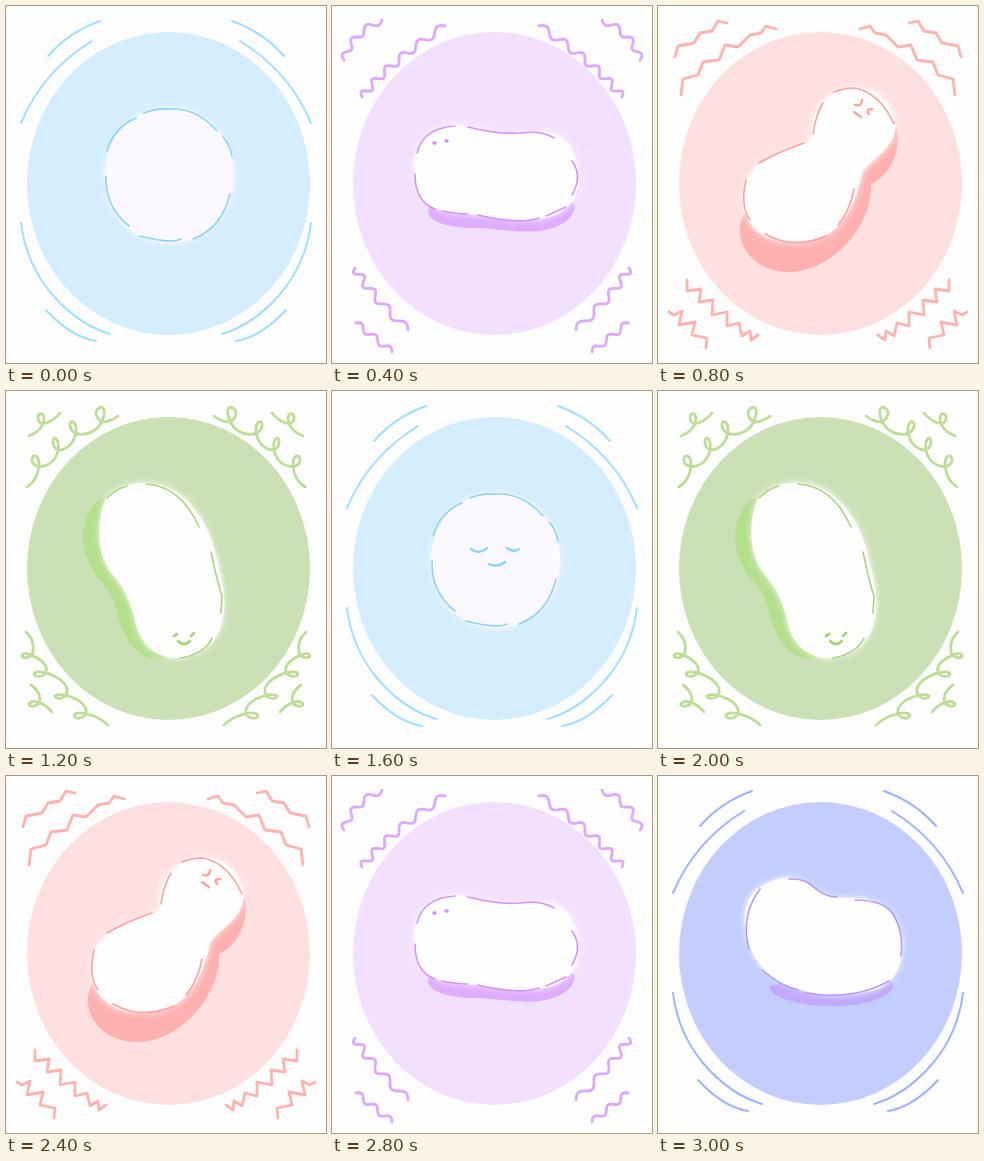
Animation, 320 px wide and 357 px high, one loop 3.2 s. Source, as an HTML page with a canvas:

```html
<!DOCTYPE html>
<html lang="en">
<head>
<meta charset="utf-8">
<title>Colour beans</title>
<style>
html, body { margin: 0; width: 100%; height: 100%; overflow: hidden; background: #fdfdfd; }
canvas { display: block; width: 320px; height: 357px; }
</style>
</head>
<body>
<canvas id="stage" width="320" height="357"></canvas>
<script>
const ctx = document.getElementById('stage').getContext('2d');
const STEP = 200;

// Sine ripple laid along a quadratic curve
function wave(x0, y0, cx, cy, x1, y1, turns, amp) {
  let d = '';
  for (let i = 0; i <= 80; i++) {
    const t = i / 80, u = 1 - t;
    const dx = 2 * u * (cx - x0) + 2 * t * (x1 - cx);
    const dy = 2 * u * (cy - y0) + 2 * t * (y1 - cy);
    const k = amp * Math.sin(t * turns * 2 * Math.PI) / Math.hypot(dx, dy);
    const x = u * u * x0 + 2 * u * t * cx + t * t * x1 + dy * k;
    const y = u * u * y0 + 2 * u * t * cy + t * t * y1 - dx * k;
    d += (i ? 'L' : 'M') + x.toFixed(2) + ' ' + y.toFixed(2);
  }
  return d;
}

// Left half of each frame decoration; the right half is mirrored
const marks = {
  arcs: 'M42 50Q63 26 94 15M15 117Q37 65 86 35M15 217Q20 257 45 287Q71 318 104 328M40 304Q65 331 90 335',
  waves: wave(12, 54, 19, 28, 50, 14, 3, 3.3) + wave(30, 91, 55, 58, 113, 20, 5.5, 3.8) +
    wave(23, 262, 37, 287, 76, 324, 4, -3.8) + wave(24, 317, 42, 331, 60, 346, 2.5, 3),
  zigzag: 'M17 51L20 40L36 37L42 27L54 25L60 15L69 17' +
    'M23 89L25 73L40 69L45 56L61 54L67 39L80 41L92 29L103 27L108 20L118 23' +
    'M29 274L29 285L43 283L41 296L55 294L54 309L69 306L69 320L81 317L84 330L92 325L93 334L100 329' +
    'M11 306L16 309L24 305L21 319L37 316L34 329L49 332L48 342',
  loops: 'M23 45Q36 40 38 29C38 21 32 21 32 27C32 37 46 32 54 22' +
    'M21 96Q32 89 33 74C33 62 25 63 26 70C28 79 47 78 52 60C54 45 46 44 47 52C48 64 67 60 70 41' +
    'C71 29 63 28 64 35C66 47 87 46 95 32C101 20 98 14 93 17C87 21 91 29 97 31Q104 31 112 25' +
    'M20 241Q29 249 27 261C25 268 15 268 16 264C18 259 37 268 40 276C43 287 28 287 28 283' +
    'C30 277 55 284 61 297C63 309 49 309 49 305C52 301 75 306 80 318C82 329 68 329 68 324C72 319 92 324 102 334' +
    'M25 294Q34 300 34 309C33 317 22 316 23 313C26 308 38 311 46 321'
};

const blue = {
  mark: 'arcs', disc: '#d4edff', line: '#9fdfff', ink: '#8cd3f5', fill: '#fbf8ff',
  body: 'M99 170C99 131 126 102 164 102C202 102 228 133 228 170C228 207 202 237 164 237C126 237 99 207 99 170Z',
  edge: 'M101 145Q108 121 130 112M138 107Q150 102 165 103Q191 102 211 125M217 131Q224 139 226 150' +
    'M224 188Q216 222 187 233M175 233Q165 238 134 230M123 220Q99 201 100 170'
};
const sleepy = { ...blue, face: 'M139 158Q147 164 155 157M175 157Q181 162 187 158M157 173Q165 177 173 171' };

const lilac = {
  mark: 'arcs', disc: '#c3ceff', line: '#a0b1ff', ink: '#b59cf8', shade: '#c0a9ff',
  body: 'M92 170C82 145 86 118 104 110C120 100 138 98 152 109C165 122 175 122 195 122C222 122 238 135 243 158' +
    'C248 180 240 205 220 213C195 221 170 221 147 215C120 208 100 195 92 170Z',
  shadow: 'M112 210C108 222 150 231 175 230C205 230 232 222 235 211C236 204 230 203 226 206L120 208Z',
  edge: 'M91 173Q82 140 102 113M131 103Q148 102 158 113Q168 121 179 121M197 124Q226 124 235 138Q246 156 243 180' +
    'M104 194Q122 210 140 214M147 217Q195 225 231 205'
};

const purple = {
  mark: 'waves', disc: '#f3e0ff', line: '#dda8ff', ink: '#d294fa', shade: '#e0acff',
  body: 'M83 170C78 135 98 121 125 119C150 124 170 130 205 126C232 124 241 140 245 160C250 190 238 207 213 212' +
    'C185 218 160 209 130 208C100 206 85 195 83 170Z',
  shadow: 'M97 200C91 215 115 223 150 222C185 225 215 232 238 212C245 202 243 196 238 196L130 204Z',
  edge: 'M85 147Q91 122 123 120M136 121Q168 129 188 127Q210 124 222 132M240 155Q251 170 240 189' +
    'M83 168Q83 196 103 203M110 205Q125 208 136 208M146 209Q185 219 207 212M214 210L234 201',
  face: 'M102 137L103 137M114 135L115 135', pen: 3.6
};

const rose = {
  mark: 'waves', disc: '#ffdef3', line: '#ffabdf', ink: '#fb9ad4', shade: '#ffb0e0',
  body: 'M86 185C82 160 100 142 128 140C150 138 158 128 172 115C190 98 222 98 236 120C250 145 240 172 215 182' +
    'C195 190 190 205 172 218C145 235 92 228 86 185Z',
  shift: [4, 16]
};

const pink = {
  mark: 'zigzag', disc: '#ffe0e0', line: '#ffb2b0', ink: '#ffa19e', shade: '#ffb1af',
  body: 'M154 130C150 100 175 81 198 81C222 82 240 102 237 126C232 146 210 155 204 168C198 195 185 238 135 237' +
    'C100 236 84 215 85 190C86 160 115 148 140 140C150 137 154 135 154 130Z',
  shadow: 'M86 208C72 235 95 268 135 266C180 262 215 215 213 178C230 170 243 150 239 122L150 180Z',
  edge: 'M155 128Q158 108 165 97M176 86Q186 82 197 82Q222 87 236 118M101 157Q120 146 146 137' +
    'M88 174Q82 200 92 214M107 228Q135 244 168 230M196 183Q192 205 180 219',
  face: 'M197 99Q204 101 204 94M214 103Q207 103 211 108M196 106L203 111'
};

const yellow = {
  mark: 'waves', disc: '#fff0cf', line: '#ffd98d', ink: '#fbcd79', shade: '#ffdc98',
  body: 'M125 120C125 92 145 82 165 83C190 85 205 105 201 132C198 155 212 175 212 200C212 235 190 254 160 253' +
    'C128 252 110 230 113 200C115 170 125 150 125 120Z',
  shift: [-10, 10]
};

const green = {
  mark: 'loops', disc: '#cbe0b4', line: '#bedd97', ink: '#abd27f', shade: '#b4df8b',
  body: 'M100 107C115 90 145 87 167 99C190 112 205 140 210 165C217 190 222 215 215 235C208 258 188 268 165 267' +
    'C143 262 133 250 128 225C123 205 116 195 104 180C90 160 91 128 100 107Z',
  shadow: 'M101 105C72 118 70 160 93 188C112 205 108 222 119 242C127 262 140 268 157 268L170 200Z',
  edge: 'M101 107Q110 98 121 95M140 93Q175 95 193 136M205 161Q211 190 216 205L215 222M206 247Q200 262 175 267',
  face: 'M168 245L171 243M185 245L188 242M172 250Q178 256 184 250', pen: 2.8
};

const mint = {
  mark: 'loops', disc: '#c9f0e4', line: '#96e2cb', ink: '#8adac0', shade: '#9fe5cf',
  body: 'M112 130C120 103 150 92 180 102C212 113 226 150 221 185C216 222 190 245 160 243C130 240 112 215 116 190' +
    'C118 172 104 155 112 130Z',
  shift: [-9, 5]
};

const half = [blue, lilac, purple, rose, pink, yellow, green, mint];
const cycle = [...half, sleepy, ...half.slice(1).reverse()];

function stroke(d, color, width) {
  ctx.strokeStyle = color;
  ctx.lineWidth = width;
  ctx.stroke(new Path2D(d));
}

function drawBean(p) {
  const body = new Path2D(p.body);
  ctx.fillStyle = p.shade;
  if (p.shadow) ctx.fill(new Path2D(p.shadow));
  if (p.shift) {
    ctx.save();
    ctx.translate(...p.shift);
    ctx.fill(body);
    ctx.restore();
  }
  ctx.save();
  ctx.shadowColor = 'rgba(255,255,255,.85)';
  ctx.shadowBlur = 7;
  ctx.fillStyle = p.fill || '#fefefe';
  ctx.fill(body);
  ctx.restore();

  if (!p.edge) ctx.setLineDash([48, 16, 26, 12]);
  stroke(p.edge || p.body, p.ink, 1.6);
  ctx.setLineDash([]);
  if (p.face) stroke(p.face, p.ink, p.pen || 2.3);
}

function draw(p) {
  ctx.fillStyle = '#fdfdfd';
  ctx.fillRect(0, 0, 320, 357);
  ctx.lineCap = ctx.lineJoin = 'round';

  ctx.fillStyle = p.disc;
  ctx.beginPath();
  ctx.ellipse(162.5, 177.5, 141.5, 151.5, 0, 0, 2 * Math.PI);
  ctx.fill();

  const width = p.mark === 'arcs' ? 2 : 2.8;
  stroke(marks[p.mark], p.line, width);
  ctx.save();
  ctx.transform(-1, 0, 0, 1, 320, 0);
  stroke(marks[p.mark], p.line, width);
  ctx.restore();

  drawBean(p);
}

const start = performance.now();
function tick(now) {
  const t = Math.max(0, now - start);
  draw(cycle[Math.floor(t / STEP) % cycle.length]);
  requestAnimationFrame(tick);
}
tick(start);
</script>
</body>
</html>
```
